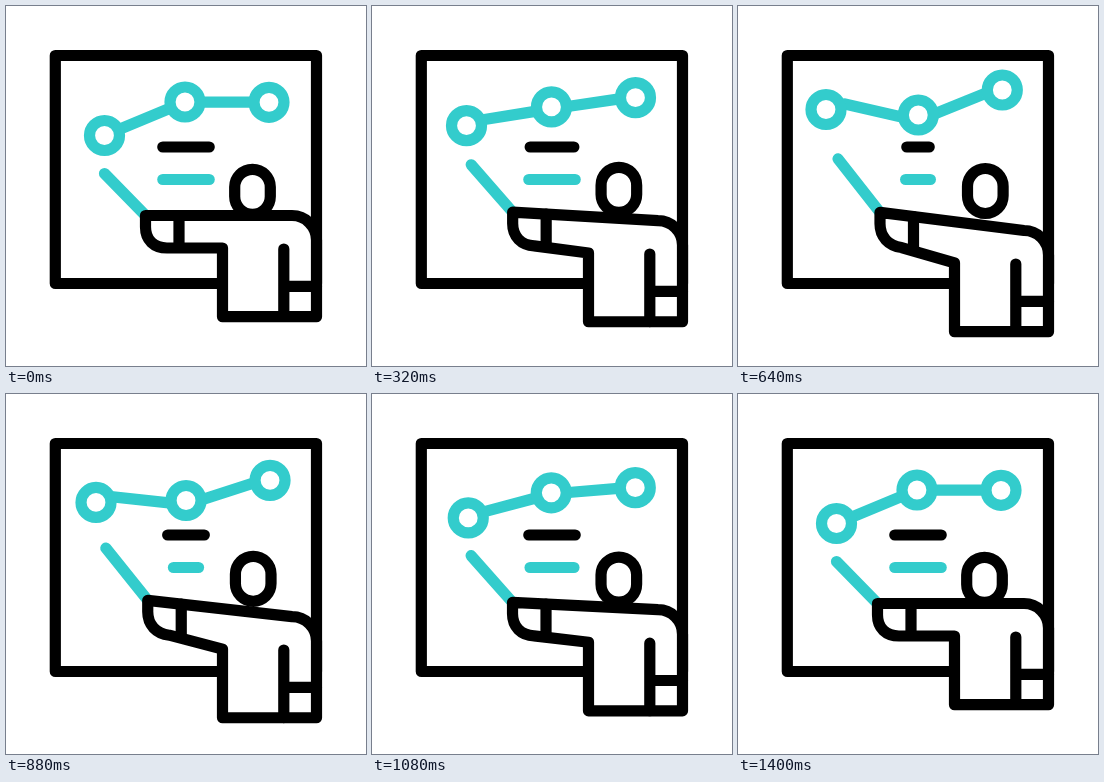
An HTML page for the animation above (1640 ms loop, 360 px wide and 360 px high).

```html
<!DOCTYPE html>
<html lang="en">
<head>
<meta charset="utf-8">
<title>Presenter</title>
<style>
html, body { margin: 0; width: 100%; height: 100%; overflow: hidden; background: #fff; }
svg { display: block; width: 100vw; height: 100vh; }
svg * { stroke: #000; stroke-width: 11.2; stroke-linecap: round; stroke-linejoin: round; fill: none; }
svg .teal { stroke: #33cccc; }
svg .solid { fill: #fff; }
</style>
</head>
<body>
<svg viewBox="0 0 360 360">
  <rect x="49.3" y="49.5" width="261.2" height="228"/>
  <path id="links" class="teal"/>
  <circle class="teal solid" r="15"/>
  <circle class="teal solid" r="15"/>
  <circle class="teal solid" r="15"/>
  <path id="bar1"/>
  <path id="bar2" class="teal"/>
  <path id="pointer" class="teal"/>
  <rect id="head" class="solid" x="228.7" y="163.3" width="35.6" height="45" rx="17.8"/>
  <path id="body" class="solid"/>
  <path id="seams"/>
</svg>
<script>
const LOOP = 1640, STEP = 40, RAD = Math.PI / 180;
const $ = id => document.getElementById(id);
const circles = document.querySelectorAll('circle');

function ease(t, from, to) {
  const s = Math.min(1, Math.max(0, (t - from) / (to - from)));
  return s * s * (3 - 2 * s);
}

// Rises from 0 to 1, holds, then falls back to 0.
const pulse = (t, start, top, leave, end) => ease(t, start, top) - ease(t, leave, end);

// A link sits midway between two dots and turns at its own rate.
function link(a, b, degrees, lift) {
  const x = (a.x + b.x) / 2, y = (a.y + b.y) / 2 - lift;
  const dx = 28 * Math.cos(degrees * RAD), dy = 28 * Math.sin(degrees * RAD);
  return `M${x - dx} ${y - dy}L${x + dx} ${y + dy}`;
}

function drawChart(t) {
  const p = pulse(t, 118, 600, 747, 1222);
  const dots = [
    { x: 98.5 - 10.5 * p, y: 129.5 - 26 * p },
    { x: 179 + 1.3 * p, y: 96 + 13 * p },
    { x: 263 + 1.3 * p, y: 96.3 - 12.3 * p }
  ];
  dots.forEach(({ x, y }, i) => {
    circles[i].setAttribute('cx', x);
    circles[i].setAttribute('cy', y);
  });
  $('links').setAttribute('d',
    link(dots[0], dots[1], 35.5 * p - 22.5, 2 * p) +
    link(dots[1], dots[2], -22 * p, -p));
}

function drawBar(id, y, t) {
  const half = 23.2 - 12 * pulse(t, 250, 585, 690, 1028);
  $(id).setAttribute('d', `M${180 - half} ${y}H${180 + half}`);
}

// The arm shears upwards around the shoulder while the torso sinks.
function drawPerson(t) {
  const sink = pulse(t, 110, 650, 745, 1345);
  const raise = pulse(t, 110, 550, 770, 1320);
  const slope = Math.tan(7 * RAD) * raise;
  const y = n => n + 15 * sink;
  const arm = (x, n) => [x + 2.5 * raise, y(n) + (x - 287) * slope];
  const hand = arm(139.5, 209.5);

  $('pointer').setAttribute('d',
    `M${98.5 + 1.5 * raise} ${hand[1] - 42 - 11.5 * raise}L${hand}`);
  $('head').setAttribute('transform',
    `translate(${0.8 * raise} ${12 * (sink - raise) - 0.8 * raise})`);
  $('body').setAttribute('d',
    `M${hand}L286 ${y(209.5)}A24.5 24.5 0 0 1 310.5 ${y(234)}` +
    `V${y(310.7)}H216.5V${y(242)}L${arm(161, 242)}` +
    `C${arm(148, 242)} ${arm(139.5, 234)} ${arm(139.5, 221)}Z`);
  $('seams').setAttribute('d',
    `M${arm(173, 209.5)}L${arm(173, 241.5)}` +
    `M277.8 ${y(243)}V${y(310.5)}M277.8 ${y(280.3)}H310.5`);
}

function draw(t) {
  drawChart(t);
  drawBar('bar1', 141, t);
  drawBar('bar2', 173.5, t - 120);
  drawPerson(t);
}

function tick() {
  const t = performance.now() % LOOP;
  draw(Math.floor(t / STEP) * STEP);
  requestAnimationFrame(tick);
}
tick();
</script>
</body>
</html>
```
